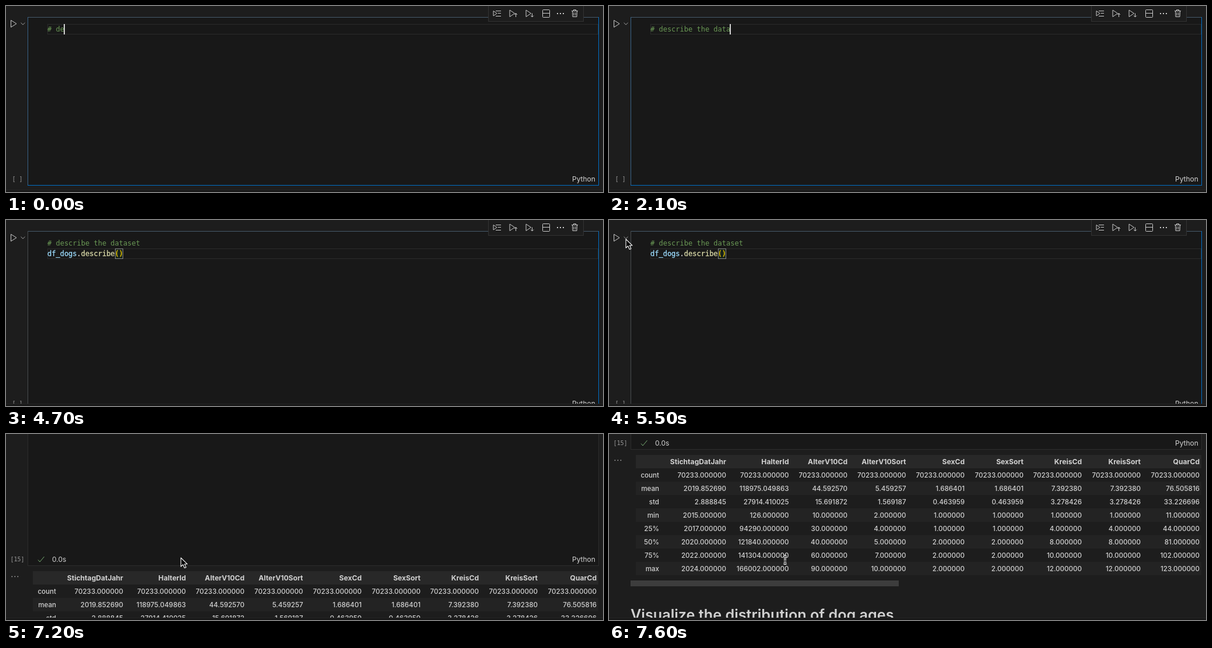
An HTML page with a canvas that plays this animation: 1024 px wide and 320 px high, repeating every 8000 ms.

```html
<!DOCTYPE html>
<html lang="en">
<head>
<meta charset="utf-8">
<title>Notebook cell</title>
<style>
html, body { margin: 0; width: 1024px; height: 320px; overflow: hidden; background: #1d1d1d; }
canvas { display: block; }
</style>
</head>
<body>
<canvas id="stage" width="1024" height="320"></canvas>
<script>
const ctx = document.getElementById('stage').getContext('2d');
const LOOP = 8000, STEP = 100, CHAR = 7.224, LEFT = 71;
const MONO = '"DejaVu Sans Mono", monospace', SANS = 'Inter, sans-serif';
const COMMENT = '# describe the dataset';
const GUESS = '# describe numerical columns';
const ENTER = 2700, ACCEPT = 3800, RUN = 5700, DONE = 6300;

const POINTER = [[4800, 240, -5], [5000, 150, 20], [5300, 60, 38], [5600, 13, 31], [5700, 13, 31],
  [6100, 222, 144], [6300, 228, 150], [6700, 297, 212], [7200, 300, 213], [7600, 302, 216]];
const SCROLL = [[6900, 0], [7200, 100], [7400, 225], [7600, 300]];

const COLUMNS = ['StichtagDatJahr', 'HalterId', 'AlterV10Cd', 'AlterV10Sort', 'SexCd', 'SexSort',
  'KreisCd', 'KreisSort', 'QuarCd'];
const RIGHTS = [201, 308.5, 409, 509.5, 610, 711, 811, 912, 1013];
const ROWS = [
  'count' + ' 70233'.repeat(9),
  'mean 2019.852690 118975.049863 44.592570 5.459257 1.686401 1.686401 7.392380 7.392380 76.505816',
  'std 2.888845 27914.410025 15.691872 1.569187 0.463959 0.463959 3.278426 3.278426 33.226696',
  'min 2015 126 10 2 1 1 1 1 11',
  '25% 2017 94290 30 4 1 1 4 4 44',
  '50% 2020 121840 40 5 2 2 8 8 81',
  '75% 2022 141304 60 7 2 2 10 10 102',
  'max 2024 166002 90 10 2 2 12 12 123'
].map(row => row.split(' '));

function along(keys, t) {
  const next = keys.findIndex(k => k[0] > t);
  if (next < 0) return keys[keys.length - 1].slice(1);
  if (next === 0) return keys[0].slice(1);
  const a = keys[next - 1], b = keys[next], f = (t - a[0]) / (b[0] - a[0]);
  return a.slice(1).map((v, i) => v + (b[i + 1] - v) * f);
}

function typedCount(t) {
  if (t < 100) return 4;
  if (t < 500) return 5;
  if (t < 800) return 6;
  if (t < 1000) return 7;
  return Math.min(COMMENT.length, 8 + Math.floor((t - 1000) / 100));
}

function box(x, y, w, h, color) {
  ctx.fillStyle = color;
  ctx.fillRect(x, y, w, h);
}

function frame(x, y, w, h, color) {
  ctx.strokeStyle = color;
  ctx.lineWidth = 1;
  ctx.strokeRect(x + .5, y + .5, w - 1, h - 1);
}

function text(str, x, y, color, font, align = 'left') {
  ctx.font = font;
  ctx.fillStyle = color;
  ctx.textAlign = align;
  ctx.fillText(str, x, y);
}

function code(str, col, y, color, style = '') {
  text(str, LEFT + col * CHAR, y, color, `${style} 12px ${MONO}`);
}

function line(d, color = '#cccccc', width = 1) {
  ctx.strokeStyle = color;
  ctx.lineWidth = width;
  ctx.stroke(new Path2D(d));
}

function star(x, y, r) {
  ctx.fillStyle = '#d0d0c8';
  ctx.beginPath();
  for (let i = 0; i < 8; i++) {
    const a = i * Math.PI / 4, d = i % 2 ? r * .42 : r;
    ctx.lineTo(x + d * Math.sin(a), y - d * Math.cos(a));
  }
  ctx.fill();
}

function toolbar() {
  box(827, -4, 164, 31, '#1d1d1d');
  frame(827, -4, 164, 31, '#333333');
  line('M836 8.5V17L842 12.7ZM840 8.5H849M843.5 12.5H849M840 17.5H849');
  line('M864 7V18.5L872.5 12.7ZM874.5 19V12.5M872 15L874.5 12.5L877 15');
  line('M892 7V18.5L900.5 12.7ZM902.5 12.5V19M900 16.5L902.5 19L905 16.5');
  line('M921.5 6.5H931.5Q932.5 6.5 932.5 7.5V18.5Q932.5 19.5 931.5 19.5H921.5Q920.5 19.5 920.5 18.5V7.5Q920.5 6.5 921.5 6.5M920.5 12.5H932.5');
  for (const x of [945, 950, 955]) box(x, 12, 2, 2, '#cccccc');
  line('M970 8.5H981M973.5 8.5V6.5H977.5V8.5M971.5 8.5L972 18.5H979L979.5 8.5M974 11V16.5M977 11V16.5');
}

function cellFrame(t, bottom) {
  box(37, 19, 980, bottom - 18, '#181818');
  const focused = t < RUN;
  box(37, 19, 980, 1, focused ? '#465a6b' : '#2d2d2d');
  box(37, 19, 1, bottom - 18, focused ? (t < ENTER ? '#3a6488' : '#484c50') : '#2d2d2d');
  box(1016, 19, 1, bottom - 18, focused ? '#0070c8' : '#2d2d2d');
  box(37, bottom, 980, 1, focused ? '#0070c8' : '#2d2d2d');
}

function editor(t) {
  const second = t >= ENTER, accepted = t >= ACCEPT;
  const count = typedCount(t), top = second ? 49 : 31;
  if (t < RUN) frame(LEFT, top, 945, 18, '#2b2b2b');
  code(COMMENT.slice(0, count), 0, 44, '#6a9955');
  if (t >= 200 && t < 400) code(GUESS.slice(count), count, 44, '#6b6b6b', 'italic');

  if (accepted) {
    if (t < RUN) {
      box(187, 49, 14, 18, '#18231a');
      frame(187, 49, 14, 18, '#888888');
    }
    const tokens = [['df_dogs', '#9cdcfe'], ['.', '#d4d4d4'], ['describe', '#dcdcaa'], ['()', '#ffd700']];
    let col = 0;
    for (const [word, color] of tokens) {
      code(word, col, 62, color);
      ctx.strokeStyle = color;
      ctx.lineWidth = .3;
      ctx.strokeText(word, LEFT + col * CHAR, 62);
      col += word.length;
    }
  } else if (second) {
    if (t >= 3000) code('df_dogs.describe()', 0, 62, '#6b6b6b', 'italic');
    star(77, 38, 7);
    star(83, 43.5, 3.5);
  }

  const since = t >= ACCEPT ? t - ACCEPT : second ? t - ENTER : 0;
  if (t < RUN && since % 1000 < 500) {
    const col = accepted ? 18 : second ? 0 : count;
    box(Math.round(LEFT + col * CHAR) - (col ? 1 : 0), top, 2, 18, '#d0d0d0');
  }
}

function statusBar(t, y) {
  const ran = t >= RUN;
  text(ran ? '[15]' : '[ ]', 19.5, y + 3.5, '#989898', `10px ${MONO}`, 'center');
  text('Python', 971, y + 4, '#d2d2d2', `12px ${SANS}`);
  if (!ran) return;
  text('0.0s', 79, y + 4, '#d2d2d2', `12px ${SANS}`);
  if (t >= DONE) {
    line(`M55 ${y + 1}L58 ${y + 4.5}L65.5 ${y - 4.5}`, '#78ad72');
    return;
  }
  ctx.save();
  ctx.translate(60, y);
  ctx.rotate((t - 6100) / 1000 * Math.PI * 2);
  line('M-4.5 -1A4.6 4.6 0 0 1 4.5 -1M4.5 1A4.6 4.6 0 0 1 -4.5 1M-6 -3L-4.5 -.5L-2 -1.5M6 3L4.5 .5L2 1.5');
  ctx.restore();
}

function output() {
  for (const x of [9.5, 14.5, 19.5]) box(x, 344.5, 1.6, 1.6, '#a8a8a8');
  box(46, 336, 970, 23, '#282828');
  COLUMNS.forEach((name, i) => text(name, RIGHTS[i], 352, '#d2d2d2', `bold 12.1px ${SANS}`, 'right'));
  ROWS.forEach((row, r) => {
    if (r % 2) box(46, 359 + r * 23, 970, 23, '#232323');
    row.forEach((cell, i) => {
      const value = !i || cell.includes('.') ? cell : cell + '.000000';
      text(value, i ? RIGHTS[i - 1] : 86, 375 + r * 23, '#d2d2d2', `500 11.6px ${SANS}`, 'right');
    });
  });
  box(37, 552, 460, 10, '#3d3d3d');
  text('Visualize the distribution of dog ages', 37, 620, '#d0d0d0', `600 25.2px ${SANS}`);
}

function pointer(t, scroll) {
  if (t < 4800) return;
  const [x, y] = along(POINTER, t);
  const docY = y + scroll;
  ctx.save();
  ctx.translate(Math.round(x), Math.round(y));
  ctx.lineJoin = 'round';
  if (x < 37 || docY < 19 || (t >= 7000 && docY > 306 && docY < 336)) {
    const arrow = new Path2D('M0 0V15L3.6 11.7L6.2 17.5L8.8 16.4L6.3 10.8H11Z');
    ctx.fillStyle = '#000000';
    ctx.fill(arrow);
    ctx.strokeStyle = '#ffffff';
    ctx.lineWidth = 1.1;
    ctx.stroke(arrow);
  } else {
    const beam = 'M-2.5 -6.5Q0 -6.5 0 -4.5Q0 -6.5 2.5 -6.5M0 -4.5V5.5M-2.5 7.5Q0 7.5 0 5.5Q0 7.5 2.5 7.5M-1.5 2.5H1.5';
    line(beam, '#ffffff', 3.2);
    line(beam, '#000000', 1);
  }
  ctx.restore();
}

function draw(now) {
  const t = Math.floor(now % LOOP / STEP) * STEP;
  const scroll = Math.round(along(SCROLL, t)[0]);
  const bottom = t < ENTER ? 308 : 326;
  box(0, 0, 1024, 320, '#1d1d1d');

  ctx.save();
  ctx.beginPath();
  ctx.rect(0, 0, 1024, 316);
  ctx.clip();
  ctx.translate(0, -scroll);
  cellFrame(t, bottom);
  editor(t);
  line('M8.5 24.5V36.5L18 30.5Z');
  line('M25.5 28.8L29 32.2L32.5 28.8', '#a0a0a0');
  statusBar(t, bottom - 10.5);
  if (t >= DONE) output();
  toolbar();
  ctx.restore();

  box(0, 316, 1024, 1, '#242424');
  box(0, 317, 1024, 3, '#181818');
  pointer(t, scroll);
}

const start = performance.now();
function tick() {
  draw(performance.now() - start);
  requestAnimationFrame(tick);
}
tick();
</script>
</body>
</html>
```
